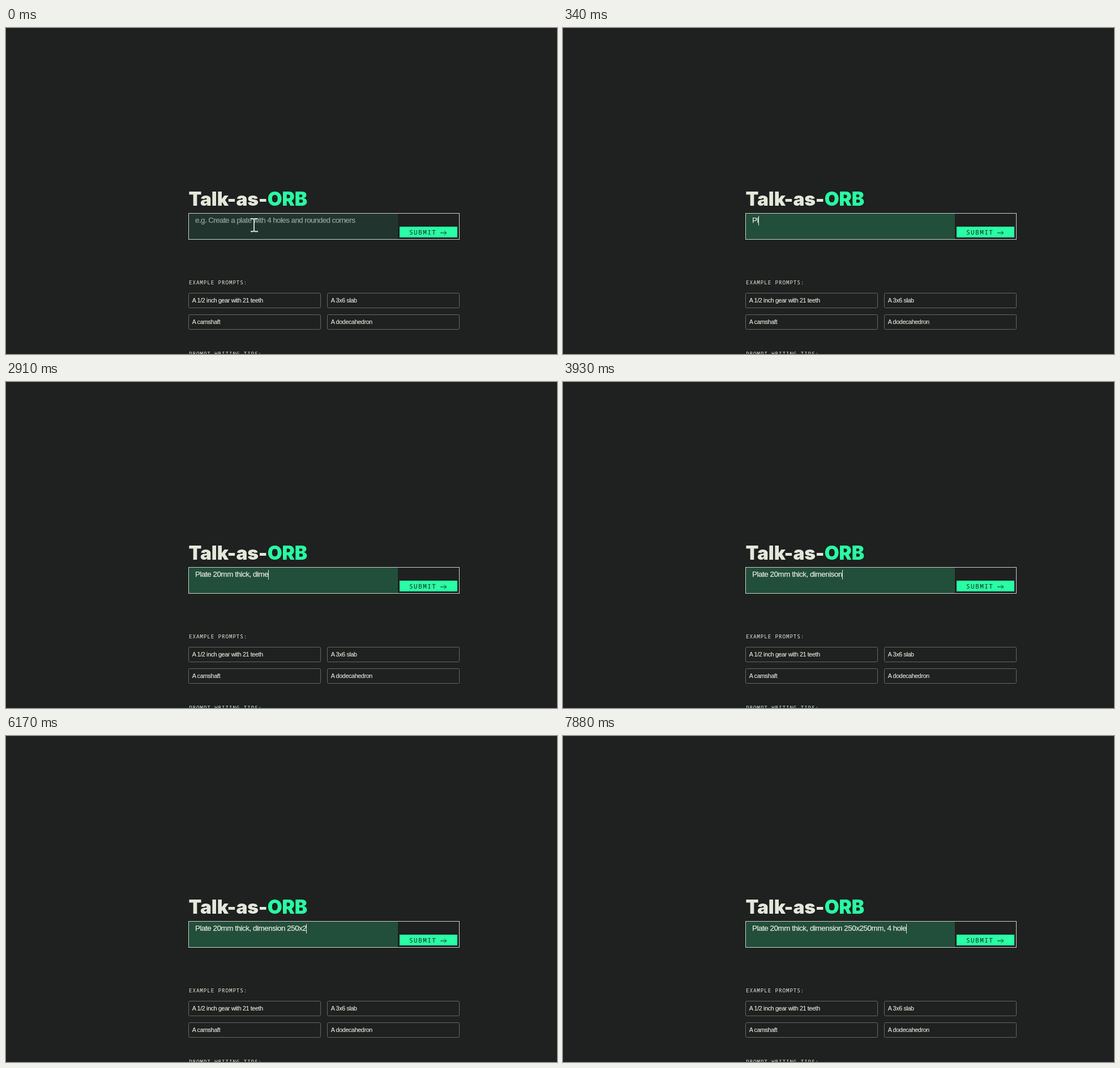
These frames come from a looping animation (973 px wide and 576 px high, 8 s). An HTML page:

```html
<!DOCTYPE html>
<html lang="en">
<head>
<meta charset="utf-8">
<title>Prompt form</title>
<style>
  html, body { margin: 0; width: 100%; height: 100%; overflow: hidden; background: #1e2120; }
  svg { display: block; width: 973px; height: 576px; }
  text { white-space: pre; fill: #e4e8db; font-family: "Liberation Sans", Arial, sans-serif; }
  .title { font: 900 33.5px Inter, sans-serif; letter-spacing: -0.1px; }
  .title tspan { fill: #29ffa4; }
  .mono { font: 500 9.3px "Noto Sans Mono", monospace; letter-spacing: 0.87px; }
  .submit { font: 500 11px "Noto Sans Mono", monospace; letter-spacing: 1.45px; fill: #1e2120; }
  .prompt { font-size: 10.7px; letter-spacing: -0.34px; stroke: #e4e8db; stroke-width: 0.15px; }
  .entry { font-size: 13.4px; letter-spacing: -0.448px; stroke: #e4e8db; stroke-width: 0.25px; }
  .hint { font-size: 13.4px; letter-spacing: -0.57px; fill: #8fa099; stroke: #8fa099; stroke-width: 0.25px; }
  .outline { fill: none; stroke: #cdd1c6; }
  .card { fill: none; stroke: #646765; }
  .thin { fill: none; stroke: #1e2120; }
</style>
</head>
<body>
<svg viewBox="0 0 973 576">
  <rect width="973" height="576" fill="#1e2120"/>
  <text class="title" x="322.5" y="314">Talk-as-<tspan>ORB</tspan></text>

  <rect id="field" x="323" y="328" width="369" height="45"/>
  <rect class="outline" x="322.5" y="327.5" width="478" height="46"/>
  <text id="hint" class="hint" x="334" y="344">e.g. Create a plate with 4 holes and rounded corners</text>
  <text id="entry" class="entry" x="334" y="344"></text>
  <rect id="caret" y="332" width="1" height="17" fill="#e4e8db"/>
  <path id="pointer" d="M432 337H436.5L438 338.5L439.5 337H444.5M438 338V358.5M432 359.5H436.5L438 358L439.5 359.5H445" fill="none" stroke="#dfe3df" stroke-width="1.8"/>

  <rect x="695" y="351" width="102" height="19" fill="#29ffa4"/>
  <text class="submit" x="712" y="365">SUBMIT</text>
  <path class="thin" d="M767 362H777.5M774 358.5L777.5 362L774 365.5"/>

  <text class="mono" x="323" y="453">EXAMPLE PROMPTS:</text>
  <g id="cards"></g>
  <text class="mono" x="323" y="578.5">PROMPT WRITING TIPS:</text>
</svg>
<script>
  const LOOP = 8000;
  const TICK = 171.3;
  const FOCUS = 1, FIRST_KEY = 2, FIXED = 25;
  const PHRASE = "Plate 20mm thick, dimension 250x250mm, 4 hole";
  const SLIP = "Plate 20mm thick, dimenison";

  // Typing rhythm: tick and letter count; equal counts are pauses.
  const RHYTHM = [
    [1, 0], [2, 2], [8, 12], [13, 20], [16, 20], [17, 22], [21, 27], [23, 27], [25, 23],
    [27, 27], [28, 28], [29, 28], [31, 30], [33, 30], [37, 35], [40, 35], [46, 45]
  ];

  const byId = id => document.getElementById(id);
  const field = byId("field"), hint = byId("hint"), entry = byId("entry");
  const caret = byId("caret"), pointer = byId("pointer");

  const CARDS = [
    ["A 1/2 inch gear with 21 teeth", "A 3x6 slab"],
    ["A camshaft", "A dodecahedron"]
  ];
  byId("cards").innerHTML = CARDS.map((row, r) => row.map((label, c) => {
    const x = 322.5 + 245 * c, y = 468.5 + 38 * r;
    return `<rect class="card" x="${x}" y="${y}" width="233" height="26" rx="2"/>
      <text class="prompt" x="${x + 6.3}" y="${y + 16}">${label}</text>`;
  }).join("")).join("");

  const show = (el, on) => el.setAttribute("visibility", on ? "visible" : "hidden");

  function letters(tick) {
    const next = RHYTHM.findIndex(point => point[0] > tick);
    if (next === 0) return 0;
    if (next < 0) return PHRASE.length;
    const [t0, n0] = RHYTHM[next - 1], [t1, n1] = RHYTHM[next];
    return Math.floor(n0 + (n1 - n0) * (tick - t0) / (t1 - t0));
  }

  const moved = tick => letters(tick) !== letters(tick - 1);

  function draw(time) {
    const tick = Math.floor((time + 5) / TICK);
    const typing = tick >= FIRST_KEY;
    const text = (tick < FIXED ? SLIP : PHRASE).slice(0, letters(tick));
    field.setAttribute("fill", tick < FOCUS ? "#21352e" : "#224e3c");
    show(hint, !typing);
    show(pointer, !typing);
    if (entry.textContent !== text) entry.textContent = text;
    const width = text ? entry.getComputedTextLength() : 0;
    caret.setAttribute("x", Math.floor(334 + width));
    // The caret blinks off once typing has rested for two ticks.
    show(caret, moved(tick) || moved(tick - 1));
  }

  const start = performance.now();
  function frame() {
    draw((performance.now() - start) % LOOP);
    requestAnimationFrame(frame);
  }
  frame();
</script>
</body>
</html>
```
